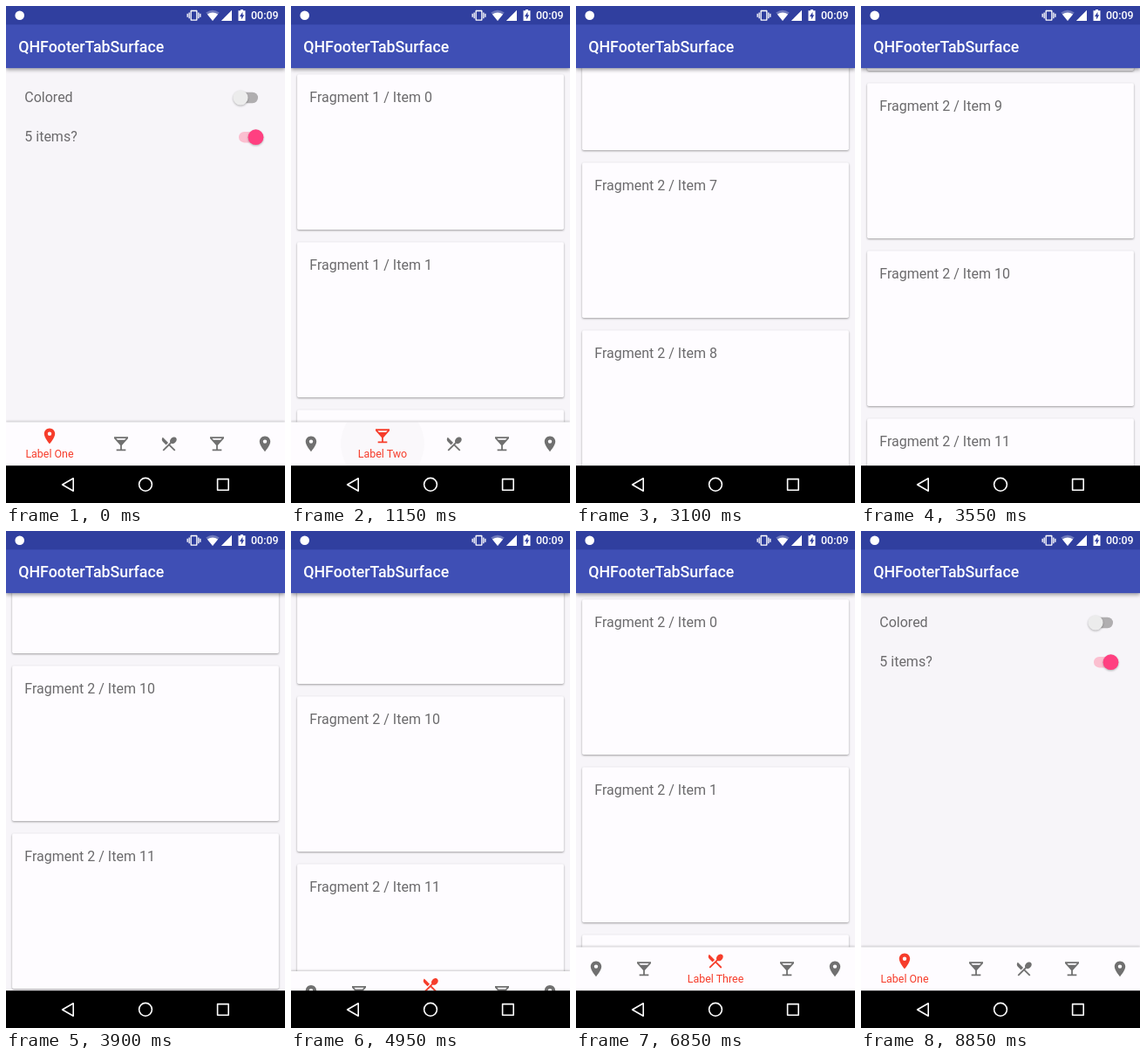
Animation of 320x569 px, one loop 8900 ms. Source, as an HTML page:

```html
<!DOCTYPE html>
<html lang="en">
<head>
<meta charset="utf-8">
<title>Bottom tabs</title>
<style>
  html, body { margin: 0; height: 100%; overflow: hidden; background: #000; }
  svg { display: block; width: 100%; height: 100%; font-family: Roboto, sans-serif; }
  .body { font-size: 16px; fill: #6b6a6c; }
  .label { font-size: 12.44px; fill: #f63d2b; text-anchor: middle; }
  .title { font-size: 17.78px; font-weight: 500; fill: #fff; }
  .clock { font-size: 12.44px; font-weight: 500; fill: #fff; }
  .card { fill: #fefcff; filter: drop-shadow(0 1px .8px rgba(0, 0, 0, .36)); }
  .thumb { filter: drop-shadow(0 1px 1px rgba(0, 0, 0, .28)); }
  .bar { filter: drop-shadow(0 2px 2px rgba(0, 0, 0, .36)); }
  .tabs { filter: drop-shadow(0 -.5px 1px rgba(0, 0, 0, .2)); }
</style>
</head>
<body>
<svg viewBox="0 0 320 569">
  <defs><clipPath id="barClip"><rect y="476.4" width="320" height="49.8"/></clipPath></defs>
  <rect width="320" height="569" fill="#f7f5f9"/>

  <g id="settings">
    <text class="body" x="21.3" y="109.8">Colored</text>
    <text class="body" x="21.3" y="155.3">5 items?</text>
    <rect x="262" y="98.8" width="27" height="12.4" rx="6.2" fill="#b0aeb0"/>
    <circle class="thumb" cx="269" cy="105" r="8.6" fill="#ececec"/>
    <rect x="267" y="144" width="27" height="12.4" rx="6.2" fill="#fbbfd0"/>
    <circle class="thumb" cx="286.5" cy="150.2" r="8.9" fill="#ff4081"/>
  </g>
  <g id="listOne"></g>
  <g id="listTwo"></g>

  <g id="nav">
    <rect class="tabs" y="476.4" width="320" height="50" fill="#fefcff"/>
    <circle id="ripple" cy="501.3" clip-path="url(#barClip)"/>
  </g>

  <rect class="bar" y="0" width="320" height="71.1" fill="#3f4fb5"/>
  <rect width="320" height="21.3" fill="#303f9f"/>
  <text class="title" x="14.2" y="53.2">QHFooterTabSurface</text>

  <g fill="#fff">
    <circle cx="15.7" cy="10.8" r="5.3"/>
    <path transform="translate(207.5 2.8) scale(.667)" d="M0 15h2V9H0v6zm3 2h2V7H3v10zm19-8v6h2V9h-2zm-3 8h2V7h-2v10zM16.5 3h-9C6.67 3 6 3.67 6 4.5v15c0 .83.67 1.5 1.5 1.5h9c.83 0 1.5-.67 1.5-1.5v-15c0-.83-.67-1.5-1.5-1.5zM16 19H8V5h8v14z"/>
    <path d="M229.3 7.6Q237 2 244.7 7.6L237 17z" opacity=".3"/>
    <path d="M230.9 9.5Q237 5.4 243.1 9.5L237 17z"/>
    <path d="M259 4.8V17H246.8z"/>
    <path d="M269 4h3v1.3h2.5V17h-8V5.3h2.5z"/>
  </g>
  <path d="M271.4 6.7L268 12h2v3.6l3.2-5.3h-1.8z" fill="#303f9f"/>
  <text class="clock" x="281" y="15.4">00:09</text>

  <rect y="526.2" width="320" height="43" fill="#000"/>
  <g fill="none" stroke="#fff" stroke-width="1.6" stroke-linejoin="round">
    <path d="M64.6 548l12.6-7.2v14.4z"/>
    <circle cx="160" cy="547.8" r="7.4"/>
    <rect x="242.6" y="541.6" width="12.6" height="12.6"/>
  </g>
</svg>

<script>
const LOOP = 8900;
const ICONS = {
  pin: 'M12 2C8.13 2 5 5.13 5 9c0 5.25 7 13 7 13s7-7.75 7-13c0-3.87-3.13-7-7-7zm0 9.5a2.5 2.5 0 0 1 0-5 2.5 2.5 0 0 1 0 5z',
  bar: 'M21 5V3H3v2l8 9v5H6v2h12v-2h-5v-5l8-9zM7.43 7L5.66 5h12.69l-1.78 2H7.43z',
  food: 'M8.1 13.34l2.83-2.83L3.91 3.5c-1.56 1.56-1.56 4.09 0 5.66l4.19 4.18zm6.78-1.81c1.53.71 3.68.21 5.27-1.38 1.91-1.91 2.28-4.65.81-6.12-1.46-1.46-4.2-1.1-6.12.81-1.59 1.59-2.09 3.74-1.38 5.27L3.7 19.87l1.41 1.41L12 14.41l6.88 6.88 1.41-1.41L13.41 13l1.47-1.47z'
};
const TABS = [['pin', 'Label One'], ['bar', 'Label Two'], ['food', 'Label Three'], ['bar', ''], ['pin', '']];
const SWITCHES = [[-1000, 0], [750, 1], [1750, 2], [8300, 0]];
const TAPS = [[650, 1], [1650, 2], [6250, 2], [8200, 0]];

const byId = id => document.getElementById(id);
const clamp = v => Math.max(0, Math.min(1, v));
const span = (t, from, length) => clamp((t - from) / length);
const lerp = (a, b, p) => a + (b - a) * p;
const smooth = p => (1 - Math.cos(Math.PI * p)) / 2;
const easeOut = (p, power) => 1 - (1 - p) ** power;

function add(parent, tag, attrs, text = '') {
  const node = document.createElementNS('http://www.w3.org/2000/svg', tag);
  for (const key in attrs) node.setAttribute(key, attrs[key]);
  node.textContent = text;
  return parent.appendChild(node);
}

function buildList(list, fragment, count) {
  for (let i = 0; i < count; i++) {
    const y = 78.3 + i * 192;
    add(list, 'rect', { class: 'card', x: 7.1, y, width: 305.8, height: 177.8, rx: 1.8 });
    add(list, 'text', { class: 'body', x: 21.3, y: y + 31.5 }, `Fragment ${fragment} / Item ${i}`);
  }
}

const nav = byId('nav'), ripple = byId('ripple');
const pages = [byId('settings'), byId('listOne'), byId('listTwo')];
buildList(pages[1], 1, 3);
buildList(pages[2], 2, 14);
const tabs = TABS.map(([icon, label]) => ({
  icon: add(nav, 'path', { d: ICONS[icon] }),
  label: add(nav, 'text', { class: 'label', y: 516.6 }, label)
}));

// Decelerating curve cubic-bezier(0, 0, .2, 1), solved by bisection.
function linearOutSlowIn(x) {
  let lo = 0, hi = 1;
  for (let i = 0; i < 20; i++) {
    const s = (lo + hi) / 2;
    if (.6 * (1 - s) * s * s + s ** 3 < x) lo = s; else hi = s;
  }
  return 3 * (1 - lo) * lo * lo + lo ** 3;
}

function scrollAt(t) {
  if (t < 2600) return 196 * span(t, 2470, 130) ** 1.6;
  if (t < 4900) return lerp(196, 1852, easeOut(span(t, 2600, 1450), 2.36));
  if (t < 6380) return lerp(1852, 1694, easeOut(span(t, 4900, 350), 2));
  if (t < 6630) return lerp(1694, 290, span(t, 6380, 250));
  return lerp(290, 0, easeOut(span(t, 6630, 170), 2));
}

function drawTabs(t, current, previous, since) {
  const p = smooth(span(t, since, 150));
  let x = -4.5;
  return tabs.map(({ icon, label }, i) => {
    const active = i === current ? p : i === previous ? 1 - p : 0;
    const width = 55 + 54 * active, center = x + width / 2;
    x += width;
    icon.setAttribute('transform', `translate(${center - 10.67} ${490.6 - 8.9 * active}) scale(.889)`);
    icon.setAttribute('fill', `rgb(${lerp(112, 246, active)}, ${lerp(112, 61, active)}, ${lerp(112, 43, active)})`);
    label.setAttribute('x', center);
    label.setAttribute('opacity', active);
    return center;
  });
}

function drawRipple(t, centers) {
  const tap = TAPS.filter(([start]) => start <= t).pop();
  const age = tap ? t - tap[0] : LOOP;
  ripple.setAttribute('cx', tap ? centers[tap[1]] : 0);
  ripple.setAttribute('r', 14 + 34 * easeOut(span(age, 0, 350), 2));
  ripple.setAttribute('opacity', .06 * span(age, -20, 100) * (1 - span(age, 200, 400)));
}

function render(t) {
  const step = SWITCHES.filter(([start]) => start <= t).length - 1;
  const [since, current] = SWITCHES[step];
  const previous = step ? SWITCHES[step - 1][1] : -1;
  pages.forEach((page, i) => {
    page.setAttribute('visibility', i === current ? 'visible' : 'hidden');
    page.setAttribute('opacity', span(t, since, 250));
  });
  pages[2].setAttribute('transform', `translate(0 ${-Math.round(scrollAt(t))})`);
  const hidden = linearOutSlowIn(span(t, 2600, 300)) - linearOutSlowIn(span(t, 4900, 300));
  nav.setAttribute('transform', `translate(0 ${50 * hidden})`);
  // The bar and its shadow leave the screen together.
  nav.setAttribute('visibility', hidden > .999 ? 'hidden' : 'visible');
  drawRipple(t, drawTabs(t, current, previous, since));
}

const begin = performance.now();
function tick() {
  render((performance.now() - begin) % LOOP);
  requestAnimationFrame(tick);
}
tick();
</script>
</body>
</html>
```
